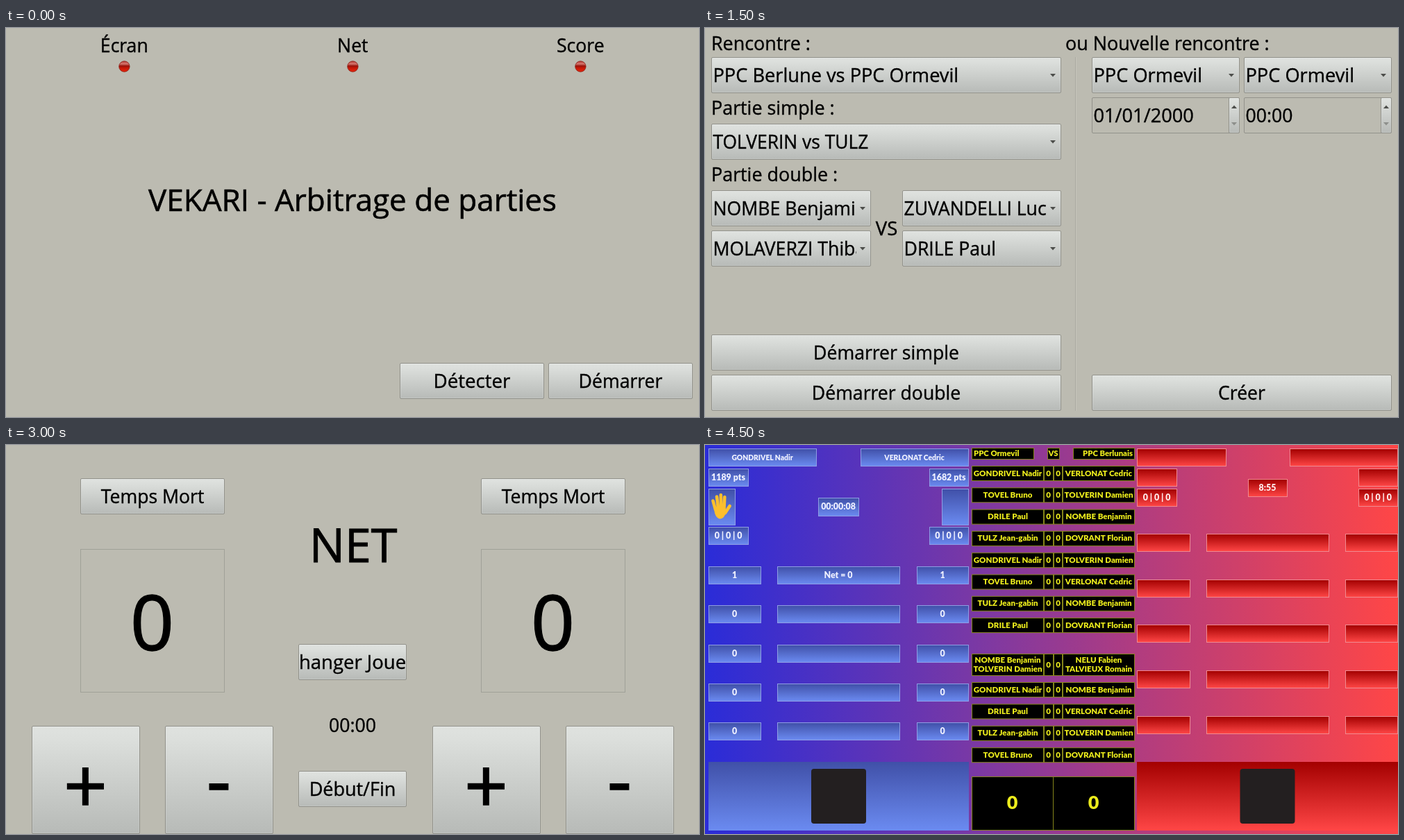
Animation, 998 px wide and 561 px high, one loop 6 s. Source, as an HTML page:

```html
<!DOCTYPE html>
<html lang="fr">
<head>
<meta charset="utf-8">
<title>Arbitrage de parties</title>
<style>
html, body { margin: 0; width: 100%; height: 100%; overflow: hidden; background: #bcbbb1; }
svg { display: block; width: 100vw; height: 100vh; }
text { white-space: pre; }
.ui { font-family: "Open Sans", "Noto Sans", sans-serif; }
.ui text { fill: #000; stroke: #000; stroke-width: .014em; }
.board { font-family: Lato, "Open Sans", sans-serif; font-weight: 900; }
</style>
</head>
<body>
<svg id="stage" viewBox="0 0 998 561" preserveAspectRatio="none">
  <defs>
    <linearGradient id="btn" x2="0" y2="1">
      <stop stop-color="#dfe2df"/><stop offset=".12" stop-color="#dcdfdc"/>
      <stop offset="1" stop-color="#b7bab7"/>
    </linearGradient>
    <linearGradient id="led" x2="0" y2="1">
      <stop stop-color="#b53a34"/><stop offset=".25" stop-color="#d4776f"/>
      <stop offset=".46" stop-color="#98120a"/><stop offset=".62" stop-color="#c41606"/>
      <stop offset="1" stop-color="#e6260d"/>
    </linearGradient>
    <linearGradient id="blue" x2="0" y2="1">
      <stop stop-color="#4050a8"/><stop offset="1" stop-color="#6b8bf1"/>
    </linearGradient>
    <linearGradient id="red" x2="0" y2="1">
      <stop stop-color="#a30000"/><stop offset="1" stop-color="#ff4646"/>
    </linearGradient>
    <linearGradient id="sky">
      <stop stop-color="#2a2cd8"/><stop offset=".38" stop-color="#7838a6"/>
      <stop offset=".62" stop-color="#b03c80"/><stop offset="1" stop-color="#ff4646"/>
    </linearGradient>
  </defs>
</svg>
<script>
const STEP = 1500;
const INK = 26.6;
const LABEL = 26.9;
const EDGE = '#92928b';
const YELLOW = '#ecec1c';
const PALE = '#eef0ff';
let clipCount = 0;

// Right and bottom are the last pixels covered by the outline.
const rect = (x, y, r, b, fill, stroke = 'none', rx = 0) =>
  `<rect x="${x + .5}" y="${y + .5}" width="${r - x}" height="${b - y}" rx="${rx}" fill="${fill}" stroke="${stroke}"/>`;

const text = (s, x, y, size = INK, anchor = 'start', fill = '') =>
  `<text x="${x}" y="${y}" font-size="${size}" text-anchor="${anchor}"${fill && ` fill="${fill}"`}>${s}</text>`;

const mid = (s, x, y, size, fill) => text(s, x, y, size, 'middle', fill);

const clip = (x, y, r, b, body) => {
  const id = 'clip' + clipCount++;
  return `<clipPath id="${id}"><rect x="${x}" y="${y}" width="${r - x}" height="${b - y}"/></clipPath>
    <g clip-path="url(#${id})">${body}</g>`;
};

const panel = (x, y, r, b) => rect(x, y, r, b, 'url(#btn)', EDGE, 1.5) +
  rect(x + 1, y + 1, r - 1, b - 1, 'none', 'rgba(255,255,255,.14)', 1);

const button = (s, x, y, r, size) => panel(x, y, r, y + 51) +
  clip(x + 1, y, r, y + 51, mid(s, (x + r + 1) / 2, y + 36, size));

const arrow = (x, y, h, fill = '#4c4d4a') =>
  `<path d="M${x - 4} ${y}h8l-4 ${h}z" fill="${fill}"/>`;

const combo = (s, x, y, r, size) => panel(x, y, r, y + 51) +
  clip(x, y, r - 20, y + 51, text(s, x + 2.5, y + 36, size)) + arrow(r - 11, y + 24, 4.5);

const spin = (s, x, y, r, size) =>
  rect(x, y, r, y + 51, 'none', EDGE, 1.5) + panel(r - 15, y, r, y + 51) + text(s, x + 2.5, y + 36, size) +
  arrow(r - 7, y + 16, -4.5) + arrow(r - 7, y + 36, 4.5, '#8d8f8b');

function home() {
  const lamps = [['Écran', 170], ['Net', 499], ['Score', 827]];
  return lamps.map(([s, x]) => mid(s, x + .3, 35) +
      `<circle cx="${x + .4}" cy="55.5" r="7.7" fill="url(#led)" stroke="#8a1a12" stroke-width=".8"/>`).join('') +
    mid('VEKARI - Arbitrage de parties', 499, 263.5, 44) +
    button('Détecter', 567, 483, 774, 27.7) +
    button('Démarrer', 781, 483, 988);
}

function setup() {
  return text('Rencontre :', 9, 32, LABEL) + text('ou Nouvelle rencontre :', 519, 32, LABEL) +
    combo('PPC Berlune vs PPC Ormevil', 9, 42, 512, 27.2) +
    text('Partie simple :', 9, 125, LABEL) +
    combo('TOLVERIN vs TULZ', 9, 138, 512, 26.4) +
    text('Partie double :', 9, 221, LABEL) +
    combo('NOMBE Benjamin', 9, 234, 238) +
    combo('MOLAVERZI Thibaut', 9, 292, 238) +
    mid('VS', 261.5, 299, 27.5) +
    combo('ZUVANDELLI Lucas', 284, 234, 512) +
    combo('DRILE Paul', 284, 292, 512) +
    button('Démarrer simple', 9, 442, 512) +
    button('Démarrer double', 9, 500, 512) +
    '<path d="M533.5 42V552" stroke="#a9a89f"/><path d="M534.5 42V552" stroke="#c6c5bc"/>' +
    combo('PPC Ormevil', 557, 42, 769, 27.2) +
    combo('PPC Ormevil', 776, 42, 988, 27.2) +
    spin('01/01/2000', 557, 100, 769, 27.2) +
    spin('00:00', 776, 100, 988) +
    button('Créer', 557, 500, 988);
}

function umpire() {
  const side = dx =>
    button('Temps Mort', 107 + dx, 48, 314 + dx) +
    rect(107 + dx, 150, 314 + dx, 356, 'none', '#a0a198') +
    mid('0', 210.5 + dx, 295.5, 110) +
    panel(37 + dx, 405, 192 + dx, 560) + mid('+', 114.5 + dx, 530.5, 110) +
    panel(229 + dx, 405, 384 + dx, 560) + mid('-', 306.5 + dx, 521.5, 110);
  return side(0) + side(577) + mid('NET', 500, 169, 68) +
    button('hanger Joue', 421, 287, 576, 27.5) +
    mid('00:00', 499, 414) +
    button('Début/Fin', 421, 470, 576, 27);
}

const HAND = `<g fill="none" stroke="#fcbf2d" stroke-width="4.6" stroke-linecap="round">
  <path d="M11.5 80.5L15 93M17 74.5L19 91M22.8 72L23.3 91M28.3 75L27.4 92M35.6 88L29 98"/>
  <path d="M13 91Q20 86 29.5 90L30 97Q28 106 22 106.5Q14 106 13 91z" fill="#fcbf2d" stroke="none"/></g>`;

function board() {
  const me = 'GONDRIVEL Nadir', foe = 'VERLONAT Cedric';
  const [tov, dri, tul] = ['TOVEL Bruno', 'DRILE Paul', 'TULZ Jean-gabin'];
  const [tol, nom, dov] = ['TOLVERIN Damien', 'NOMBE Benjamin', 'DOVRANT Florian'];
  const first = [[me, foe], [tov, tol], [dri, nom], [tul, dov], [me, tol], [tov, foe], [tul, nom], [dri, dov]];
  const last = [[me, nom], [dri, foe], [tul, tol], [tov, dov]];

  const cell = (x, y, r, b, s = '', size = 12.4) =>
    rect(x, y, r, b, 'url(#blue)', '#8f9de4') + mid(s, (x + r) / 2, (y + b) / 2 + 4.3, size, PALE);
  const hot = (x, y, r, b, s = '') =>
    rect(x, y, r, b, 'url(#red)', '#f08a90') + mid(s, (x + r) / 2, (y + b) / 2 + 4.3, 12.4, '#ffeaea');
  const dark = (x, y, r, b) => rect(x, y, r, b, '#000', '#85851a');

  const match = (left, right, y, h = 10.5) => {
    const names = (s, x) => [].concat(s).map((n, i, all) =>
      mid(n, x, y + 4 + (i - (all.length - 1) / 2) * 13, 11.5, YELLOW)).join('');
    return [[384, 487], [488, 501], [502, 514], [515, 618]]
        .map(([x, r]) => dark(x, y - h, r, y + h)).join('') +
      names(left, 436) + mid('0', 494.5, y + 4, 11.5, YELLOW) +
      mid('0', 508.5, y + 4, 11.5, YELLOW) + names(right, 567);
  };

  let out = '<rect width="998" height="561" fill="url(#sky)"/>';

  out += cell(5, 5, 160, 30, me, 10.3) + cell(224, 5, 379, 30, foe, 10.3) +
    cell(5, 34, 62, 59, '1189 pts') + cell(323, 34, 379, 59, '1682 pts') +
    cell(5, 63, 43, 115) + HAND + cell(341, 63, 379, 115) +
    cell(163, 76, 221, 102, '00:00:08') +
    cell(5, 118, 62, 143, '0 | 0 | 0') + cell(323, 118, 379, 143, '0 | 0 | 0');
  out += hot(622, 5, 750, 30) + hot(842, 5, 997, 30) +
    hot(622, 34, 679, 59) + hot(941, 34, 997, 59) + hot(782, 49, 838, 74, '8:55') +
    hot(622, 63, 679, 88, '0 | 0 | 0') + hot(941, 63, 997, 88, '0 | 0 | 0');

  for (let i = 0; i < 5; i++) {
    const y = Math.round(175 + i * 56.3), n = i ? '0' : '1';
    out += cell(5, y, 80, y + 25, n) + cell(104, y, 280, y + 25, i ? '' : 'Net = 0') +
      cell(305, y, 379, y + 25, n);
    const v = Math.round(128 + i * 65.7);
    out += hot(622, v, 698, v + 25) + hot(722, v, 898, v + 25) + hot(922, v, 997, v + 25);
  }

  out += dark(384, 4, 473, 20) + text('PPC Ormevil', 387, 16, 11.3, 'start', YELLOW) +
    dark(493, 4, 510, 20) + mid('VS', 501.5, 16, 11.3, YELLOW) +
    dark(530, 4, 618, 20) + text('PPC Berlunais', 616, 16, 11.3, 'end', YELLOW);
  first.forEach(([a, b], i) => out += match(a, b, 40.5 + i * 31.3));
  out += match([nom, tol], ['NELU Fabien', 'TALVIEUX Romain'], 316.5, 15.5);
  last.forEach(([a, b], i) => out += match(a, b, 352.5 + i * 31.4));
  out += dark(384, 478, 501, 555) + dark(501, 478, 618, 555) +
    mid('0', 442.5, 525, 27, YELLOW) + mid('0', 559.5, 525, 27, YELLOW);

  out += '<rect x="5" y="457" width="375" height="99" fill="url(#blue)"/>' +
    '<rect x="622" y="457" width="376" height="99" fill="url(#red)"/>';
  for (const x of [153, 770.5]) {
    out += `<rect x="${x}" y="467" width="79" height="79" rx="4" fill="#231f20"/>`;
  }
  return out;
}

const stage = document.getElementById('stage');
const scenes = [[home, 'ui'], [setup, 'ui'], [umpire, 'ui'], [board, 'board']].map(([draw, name], i) => {
  const g = document.createElementNS(stage.namespaceURI, 'g');
  g.setAttribute('class', name);
  g.innerHTML = draw();
  g.style.display = i ? 'none' : '';
  stage.append(g);
  return g;
});

const start = performance.now();
function tick() {
  const now = Math.floor((performance.now() - start) / STEP) % scenes.length;
  scenes.forEach((g, i) => g.style.display = i === now ? '' : 'none');
  requestAnimationFrame(tick);
}
tick();
</script>
</body>
</html>
```
